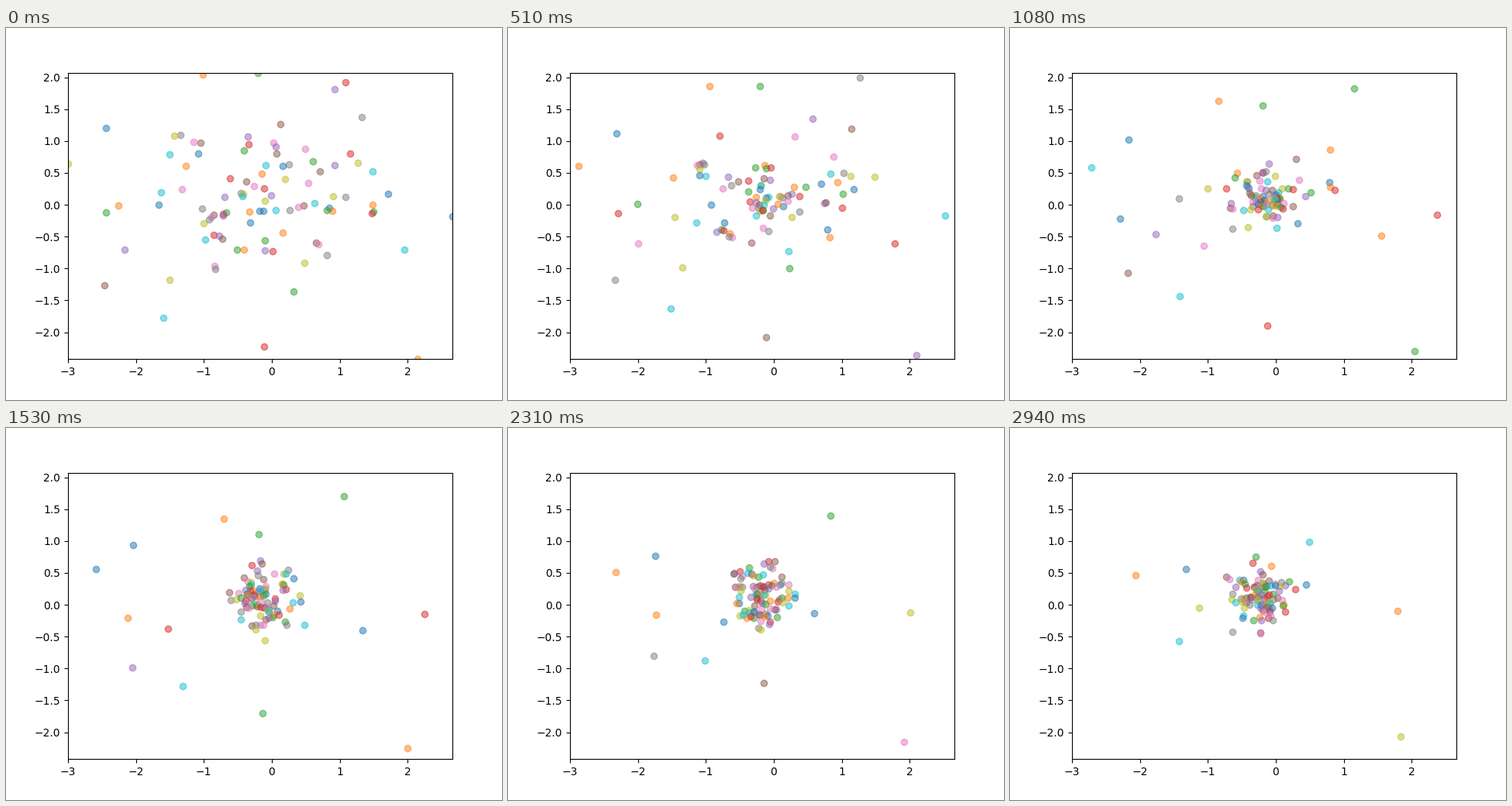
These frames come from a looping animation (640x480 px, 2.97 s). A matplotlib script:

```python
import numpy as np
import matplotlib.pyplot as plt
from matplotlib.animation import FuncAnimation

FRAMES, INTERVAL = 99, 30
COUNT = 100
G = 0.0005       # pull of one star per step
SOFT = 0.02      # softening length
MAX_STEP = 0.5   # longest move in one step

# The far stars, which fall in slowly and stay apart from the crowd
OUTER = [
    (-3.0, 0.64), (-2.44, 1.21), (2.66, -0.18), (2.15, -2.422),
    (-0.2, 2.074), (-1.02, 2.05), (1.08, 1.92), (0.92, 1.81),
    (-0.11, -2.23), (-1.6, -1.78), (-2.46, -1.27), (-2.44, -0.12),
    (-2.26, -0.01), (-2.17, -0.7), (1.95, -0.71), (1.33, 1.37),
]


def start():
    """Far stars plus a normal crowd kept inside an ellipse."""
    rng = np.random.default_rng(4)
    crowd = rng.normal((-0.1, 0), (0.95, 0.8), size=(5 * COUNT, 2))
    inside = np.hypot((crowd[:, 0] + 0.15) / 2, crowd[:, 1] / 1.7) < 1
    return np.vstack([OUTER, crowd[inside][:COUNT - len(OUTER)]])


def step(pos):
    """Move every star along the summed inverse-square pull."""
    d = pos[None] - pos[:, None]
    r2 = (d ** 2).sum(-1) + SOFT ** 2
    pull = G * (d / r2[..., None] ** 1.5).sum(1)
    size = np.hypot(pull[:, 0], pull[:, 1])[:, None]
    return pos + pull * np.minimum(1, MAX_STEP / np.maximum(size, 1e-9))


def tree_order(pos, depth=20):
    """Quadtree walk over the bounding box: NW, NE, SE, SW."""
    lo, hi = pos.min(0), pos.max(0)
    u = (pos - lo) / (hi - lo)
    key = np.zeros(len(pos), dtype=np.int64)
    for _ in range(depth):
        u = u * 2
        bit = np.minimum(np.floor(u), 1).astype(int)
        u = u - bit
        right, up = bit.T
        key = key * 4 + np.where(up == 1, right, 3 - right)
    return np.argsort(key, kind="stable")


track = [start()]
while len(track) < FRAMES:
    track.append(step(track[-1]))
track = [p[tree_order(p)] for p in track]

# Colours follow the tree walk, so they change as the stars move
fig, ax = plt.subplots(figsize=(6.4, 4.8), dpi=100)
dots = [ax.scatter([x], [y], color=f"C{i % 10}", alpha=0.5)
        for i, (x, y) in enumerate(track[0])]
low, high = track[0].min(0), track[0].max(0)
ax.set_xlim(low[0], high[0])
ax.set_ylim(low[1], high[1])


def draw(n):
    for dot, place in zip(dots, track[n]):
        dot.set_offsets(place)
    return dots


anim = FuncAnimation(fig, draw, frames=FRAMES, interval=INTERVAL,
                     repeat=True, repeat_delay=0)
plt.show()
```
